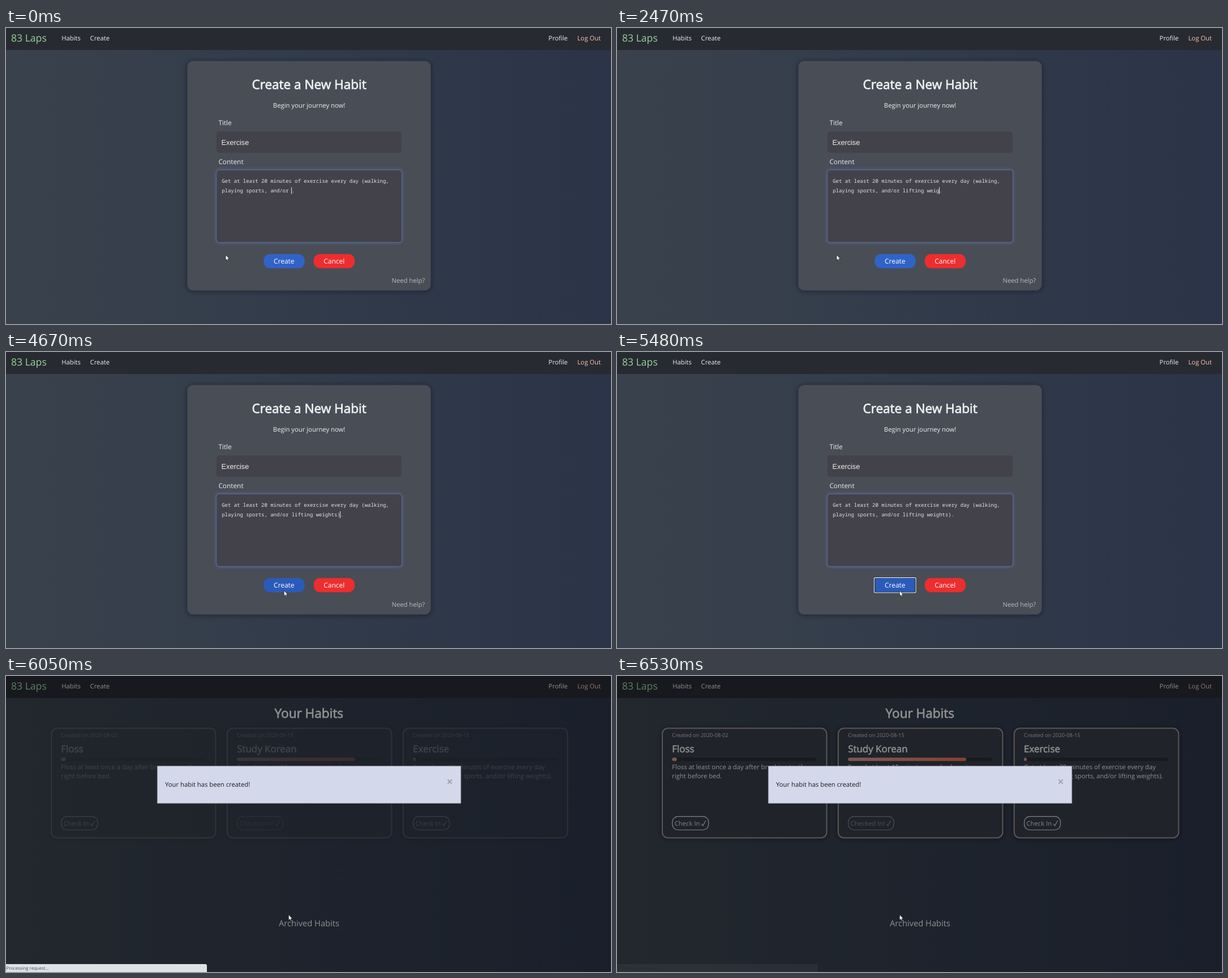
Animation of 1069x524 px, one loop 8.89 s. Source, as an HTML page:

```html
<!DOCTYPE html>
<html lang="en">
<head>
<meta charset="utf-8">
<title>Create a New Habit</title>
<style>
  html, body { margin: 0; width: 100%; height: 100%; overflow: hidden; background: #333b49; }
  svg { display: block; width: 100vw; height: 100vh; }
  text { font: 11.28px "Open Sans", sans-serif; fill: #eeeff0; text-rendering: geometricPrecision; white-space: pre; }
  .mid { text-anchor: middle; }
  .heavy { stroke: #eeeff0; stroke-width: .75px; }
  .h1 { font-size: 22.56px; }
  .h2 { font-size: 16.92px; stroke-width: .55px; }
  .brand { font-size: 17.6px; fill: #97d59b; }
  .label { font-size: 11.85px; }
  .btn { font-size: 11.985px; fill: #fff; }
  .mono { font: 8.96px "Noto Sans Mono", monospace; fill: #e4e4e6; }
  .small { font-size: 9.4px; fill: #c4c6cb; }
</style>
</head>
<body>
<svg viewBox="0 0 1069 524" preserveAspectRatio="none">
  <defs>
    <linearGradient id="sky">
      <stop offset="0" stop-color="#39424c"/>
      <stop offset="1" stop-color="#2b3448"/>
    </linearGradient>
    <linearGradient id="heat" gradientUnits="userSpaceOnUse" x1="0" x2="255">
      <stop offset="0" stop-color="#cc958c"/>
      <stop offset="1" stop-color="#ea6040"/>
    </linearGradient>
    <filter id="shade" x="-20%" y="-20%" width="140%" height="140%">
      <feDropShadow dx="0" dy="1" stdDeviation="5" flood-color="#14171f" flood-opacity=".5"/>
    </filter>
    <filter id="blur" x="-10%" y="-20%" width="120%" height="140%">
      <feGaussianBlur stdDeviation="2.6"/>
    </filter>
  </defs>

  <rect width="1069" height="524" fill="url(#sky)"/>
  <rect width="1069" height="39" fill="#282a32"/>
  <text class="brand" x="9" y="24">83 Laps</text>
  <text x="98.2" y="22.3">Habits</text>
  <text x="148.6" y="22.3">Create</text>
  <text x="958.6" y="22.3">Profile</text>
  <text x="1009.5" y="22.3" style="fill:#f8c3ae">Log Out</text>

  <g id="form">
    <rect x="320.5" y="58.5" width="430" height="406" rx="10" fill="#4a4d56" filter="url(#shade)"/>
    <text class="mid h1 heavy" x="535.6" y="107.7">Create a New Habit</text>
    <text class="mid" x="535.6" y="141.3">Begin your journey now!</text>
    <text class="label" x="375.4" y="172.4">Title</text>
    <rect x="372" y="183" width="327" height="38" rx="5" fill="#43424b"/>
    <text x="380.6" y="206.5" style="font:12.69px 'Liberation Sans',Arial,sans-serif">Exercise</text>
    <text class="label" x="375.4" y="241.4">Content</text>
    <rect id="glow" x="370.5" y="250" width="330" height="131" rx="6" fill="#5b79b8" filter="url(#blur)"/>
    <rect x="372" y="251.5" width="327" height="128" rx="5" fill="#43424b"/>
    <rect id="ring" x="371.7" y="251.2" width="327.8" height="128.4" rx="5.5" fill="none" stroke="#5a6a90"/>
    <text class="mono" x="381.2" y="274">Get at least 20 minutes of exercise every day (walking,</text>
    <text class="mono" id="typed" x="381.2" y="291.2"></text>
    <rect id="caret" y="282" width="1" height="12" fill="#e8e8ea"/>
    <g id="focus">
      <rect x="454" y="399" width="74.5" height="27.5" rx="2.5" fill="#fff"/>
      <rect x="455" y="400" width="72.5" height="25.5" rx="2" fill="#101318"/>
    </g>
    <rect id="create" y="400.3"/>
    <text class="mid btn" x="491.3" y="417.2">Create</text>
    <rect x="543.7" y="400.3" width="72.3" height="25" rx="11" fill="#ee2d2e"/>
    <text class="mid btn" x="579.8" y="417.2">Cancel</text>
    <text x="681.4" y="450.8" style="fill:#b9bbc0">Need help?</text>
  </g>

  <g id="list">
    <text class="mid h1 heavy" x="535.3" y="74">Your Habits</text>
    <g id="cards"></g>
    <text class="mid" x="535.5" y="443.4" style="font-size:14.66px">Archived Habits</text>
    <rect width="1069" height="524" fill="#000" opacity=".4"/>
    <rect x="267.3" y="159.3" width="536.5" height="66" fill="#d3d8ea" stroke="#8f929c" stroke-width=".8"/>
    <text x="281" y="196" style="fill:#1b1c20">Your habit has been created!</text>
    <text class="mid" x="784" y="194.2" style="font-size:19.7px;font-weight:700;fill:#a3a4a8">×</text>
  </g>

  <g id="status">
    <path d="M0 510H352Q355 510 355 513V524H0Z" fill="#dee1e6"/>
    <text x=".6" y="520" style="font-size:7.8px;fill:#4b4e53">Processing request...</text>
  </g>
  <path id="mouse" d="M0 0V9.8L2.2 7.8 3.7 11 5.2 10.3 3.8 7.2H6.8Z" fill="#fff" stroke="#111" stroke-width=".7"/>
</svg>

<script>
const LOOP = 8890;
const $ = id => document.getElementById(id);
const set = (id, attrs) => {
  for (const k in attrs) $(id).setAttribute(k, attrs[k]);
};
const ramp = (t, a, b) => Math.min(1, Math.max(0, (t - a) / (b - a)));
const mix = (a, b, p) => a + (b - a) * p;
const rgb = (a, b, p) => `rgb(${a.map((v, i) => Math.round(mix(v, b[i], p)))})`;

const BLUE = [48, 99, 200], HOVER = [43, 91, 186], PRESSED = [38, 80, 160];
const LEAD = 'playing sports, and/or ', TAIL = 'lifting weights)';
const KEYS = [880, 1080, 1150, 1320, 1400, 1490, 1800, 2060, 2150, 2240, 2330, 2470, 2570, 2670, 2770, 3090];
const CARET_OFF = [[300, 810], [3650, 4150], [4710, 5210], [5480, LOOP]];

function card(i, { date, title, lines, fill, done }) {
  const pill = done ? 80.5 : 64;
  const end = done ? 75.5 : 59.5;
  return `<g transform="translate(${(97.3 + i * 310.9).toFixed(1)})">
    <rect x="-17.3" y="92.5" width="290.5" height="194" rx="10" fill="#363b44" stroke="#968e88" stroke-width="2" filter="url(#shade)"/>
    <text class="small" y="108.2">Created on ${date}</text>
    <text class="h2 heavy" y="134.6">${title}</text>
    <rect y="144.5" width="255" height="6" rx="3" fill="#2a2b31"/>
    <rect y="144.5" width="${fill}" height="6" rx="3" fill="url(#heat)"/>
    ${lines.map((s, n) => `<text y="${165.3 + n * 15.3}">${s}</text>`).join('')}
    <g opacity="${done ? .45 : 1}">
      <rect x=".5" y="248.7" width="${pill}" height="23.8" rx="10" fill="none" stroke="#d3d8ea" stroke-width="1.2"/>
      <text x="4.4" y="265.3" style="fill:#d9dcea">${done ? 'Checked In!' : 'Check In'}</text>
      <path d="M${end - 7.5} 261.6l2.4 3.5 5-9" fill="none" stroke="#d9dcea" stroke-width="1.1"/>
    </g>
  </g>`;
}

$('cards').innerHTML = [
  { date: '2020-08-02', title: 'Floss', fill: 8.5,
    lines: ['Floss at least once a day after brushing teeth', 'right before bed.'] },
  { date: '2020-08-15', title: 'Study Korean', fill: 209, done: true,
    lines: ['Spend at least 15 minutes per day learning'] },
  { date: '2020-08-15', title: 'Exercise', fill: 5,
    lines: ['Get at least 20 minutes of exercise every day', '(walking, playing sports, and/or lifting weights).'] }
].map((c, i) => card(i, c)).join('');

function draw(t) {
  const listed = t >= 6050;
  set('form', { display: listed ? 'none' : 'inline' });
  set('list', { display: listed ? 'inline' : 'none' });

  const count = KEYS.filter(k => t >= k).length;
  const line = LEAD + TAIL.slice(0, count) + '.';
  if ($('typed').textContent !== line) $('typed').textContent = line;
  const hidden = CARET_OFF.some(([a, b]) => t >= a && t < b);
  set('caret', { x: Math.floor(504.8 + 5.375 * count), opacity: hidden ? 0 : 1 });

  const rest = 1 - ramp(t, 4310, 4930);
  const mx = mix(388, 499.3, 1 - rest ** 3);
  const my = mix(401.5, 422.5, 1 - rest ** 5);
  set('mouse', { transform: `translate(${mx.toFixed(2)} ${my.toFixed(2)})` });

  const pressed = t >= 5480;
  const press = ramp(t, 5480, 5700);
  set('create', {
    x: pressed ? 456 : 455.3, width: pressed ? 70.5 : 72.3,
    height: pressed ? 24.5 : 25, rx: pressed ? 2 : 11,
    fill: pressed ? rgb(HOVER, PRESSED, press) : rgb(BLUE, HOVER, ramp(t, 4450, 4650))
  });
  set('focus', { opacity: pressed ? 1 : 0 });
  set('glow', { opacity: .55 * (1 - press) });
  set('ring', { opacity: 1 - press });

  set('cards', { opacity: mix(.28, 1, ramp(t, 6050, 6530)) });
  set('status', { opacity: listed ? mix(1, .05, ramp(t, 6250, 6530)) : ramp(t, 5640, 5800) });
}

const start = performance.now();
function tick() {
  draw((performance.now() - start) % LOOP);
  requestAnimationFrame(tick);
}
tick();
</script>
</body>
</html>
```
